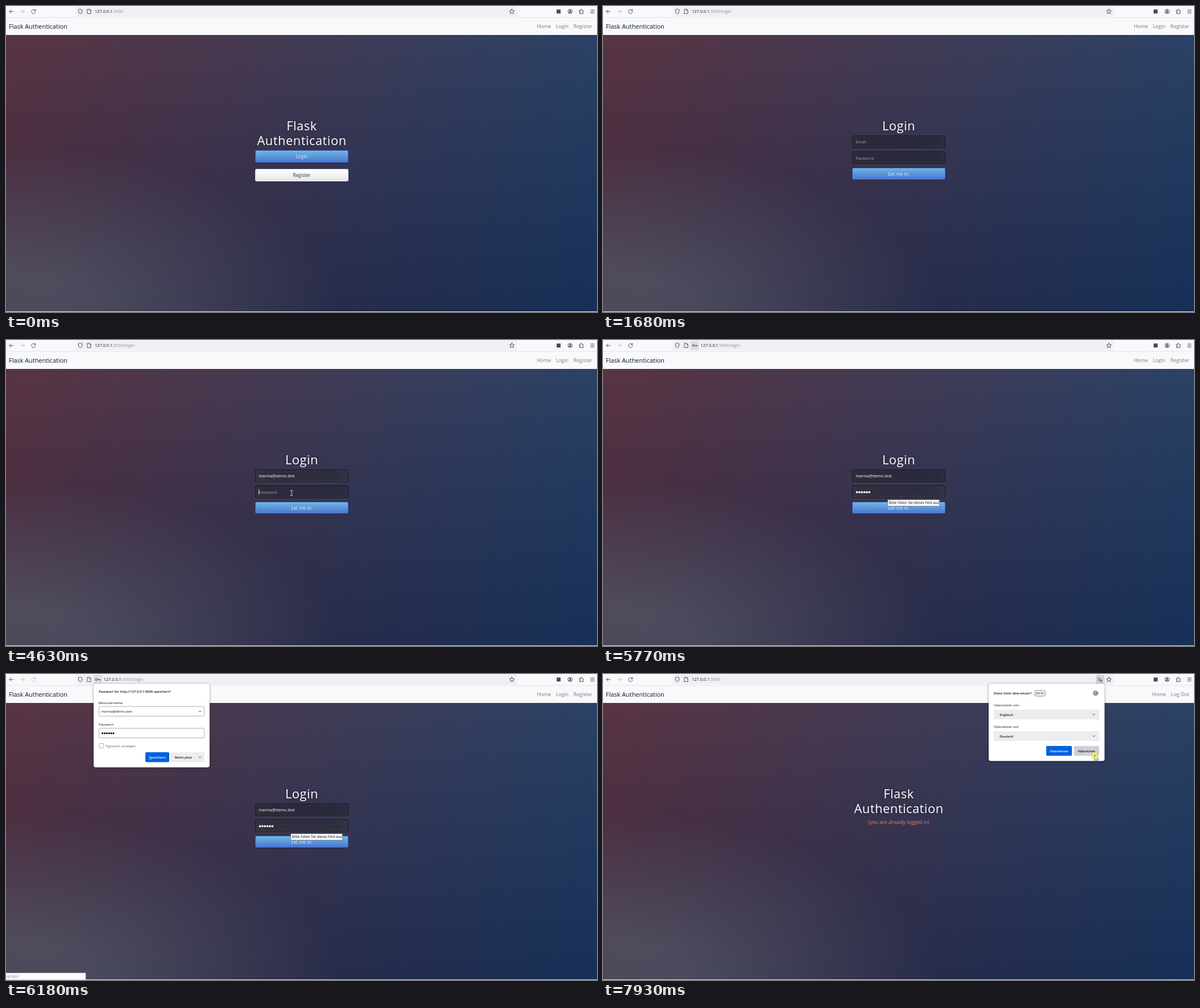
These frames come from a looping animation (1039x539 px, 8000 ms). An HTML page:

```html
<!DOCTYPE html>
<html lang="en">
<head>
<meta charset="utf-8">
<title>Flask Authentication</title>
<style>
html, body { margin: 0; width: 100%; height: 100%; overflow: hidden; background: #ececf1; }
#stage { position: absolute; left: 0; top: 0; width: 1039px; height: 539px; overflow: hidden; }
#page {
  position: absolute; left: 0; top: 20px; width: 1039px; height: 518px;
  background:
    radial-gradient(ellipse at 0% 100%, rgba(104,128,138,.4) 10%, rgba(138,114,76,0) 40%),
    linear-gradient(to bottom, rgba(57,173,219,.25) 0%, rgba(42,60,87,.4) 100%),
    linear-gradient(135deg, #670d10 0%, #092756 100%);
}
.box { position: absolute; left: 438.2px; width: 163.8px; box-sizing: border-box; border-radius: 2.2px; }
.btn {
  height: 21.8px; border: .55px solid #e6e6e6;
  background: linear-gradient(#fff, #e6e6e6);
  box-shadow: inset 0 .55px 0 rgba(255,255,255,.2), 0 .55px 1.1px rgba(0,0,0,.3);
}
.primary {
  border-color: #3762bc; background: linear-gradient(#6eb6de, #4a77d4);
  box-shadow: inset 0 .55px 0 rgba(255,255,255,.2), 0 .55px 1.1px rgba(0,0,0,.5);
}
.field {
  --glow: .2; height: 22.9px; background: rgba(0,0,0,.3); border: .55px solid rgba(0,0,0,.3);
  box-shadow: inset 0 -2.7px 24.6px rgba(100,100,100,var(--glow)), 0 .55px .55px rgba(255,255,255,.2);
}
svg { position: absolute; left: 0; top: 0; }
text { font-family: "Open Sans", "Noto Sans", sans-serif; white-space: pre; }
.mid { text-anchor: middle; }
.brand { font-size: 10.92px; fill: #10182c; }
.nav text { font-size: 8.74px; fill: #757a82; }
.h1 { font-size: 21.84px; letter-spacing: .546px; fill: #fff; text-anchor: middle; filter: drop-shadow(0 0 3px rgba(0,0,0,.3)); }
.label { font-size: 8.19px; text-anchor: middle; }
.shade { fill: #fff; filter: drop-shadow(.5px .5px .5px rgba(0,0,0,.4)); }
.val { font-size: 7.1px; fill: #fff; }
.hint { font-size: 7.1px; fill: #fff; fill-opacity: .54; }
.note { font-size: 8.74px; fill: #f97c54; text-anchor: middle; }
.addr { font-size: 7.4px; fill: #18181f; }
.ui { font-size: 6.1px; fill: #15141a; }
.ui .strong { font-weight: 600; }
.ui .title { font-weight: 600; font-size: 5.85px; }
.ui .white { fill: #fff; }
.icon { fill: none; stroke: #4b4b55; stroke-width: .95; stroke-linecap: round; stroke-linejoin: round; }
.edge { fill: none; stroke: #8f8f9d; stroke-width: .7; }
.panel { fill: #fff; stroke: rgba(0,0,0,.16); stroke-width: .5; filter: drop-shadow(0 1px 2px rgba(0,0,0,.3)); }
.blue { fill: #0061e0; }
.soft { fill: #ededf0; }
.dots { stroke-linecap: round; }
</style>
</head>
<body>
<div id="stage">
  <div id="page"></div>

  <div data-on="0 1140">
    <div class="box btn primary" id="loginBtn" style="top:254.3px"></div>
    <div class="box btn" style="top:287.3px"></div>
  </div>
  <div data-on="1140 6240">
    <div class="box field" id="mailBox" style="top:227.9px"></div>
    <div class="box field" id="passBox" style="top:256.3px"></div>
    <div class="box btn primary" style="top:284.6px"></div>
  </div>

  <svg width="1039" height="539" viewBox="0 0 1039 539">
    <defs>
      <path id="chev" class="icon" d="M-2.1-1.1L0 1L2.1-1.1"/>
    </defs>

    <!-- browser bar -->
    <rect width="1039" height="20" fill="#f9f9fb"/>
    <rect x="123" y="1" width="775" height="17.3" rx="2" fill="#f0f0f4"/>
    <rect y="20" width="1039" height="31" fill="#f8f9fa"/>
    <rect y="19.8" width="1039" height=".8" fill="#dedee5"/>
    <g class="icon">
      <path d="M12.8 9.7H6M9 6.7L6 9.7L9 12.7"/>
      <path stroke="#bcbcc6" style="stroke:#bcbcc6" d="M25.5 9.7H32.3M29.3 6.7L32.3 9.7L29.3 12.7"/>
      <path id="reload" d="M51.3 7.6A3.6 3.6 0 1 0 52 10.4M52 5.8V8.3H49.5"/>
      <path data-on="1010 1140 5910 6110" stroke-width="1.3" d="M46.2 8.6L48 6.6M46.4 6.6H48V8"/>
      <path d="M130.7 5.6L134 6.8V9.2Q134 12.3 130.7 13.8Q127.4 12.3 127.4 9.2V6.8Z"/>
      <path d="M143.3 5.8H147L149.2 8V13.4H143.3ZM147 5.8V8H149.2"/>
      <path id="star"/>
      <circle cx="991.7" cy="9.6" r="3.8"/>
      <circle cx="991.7" cy="8.5" r="1.2" fill="#4b4b55"/>
      <path d="M989.7 11.7Q991.7 10.4 993.7 11.7" stroke-width="1.4"/>
      <path d="M1008.3 7.8H1010V6.8A1.2 1.2 0 0 1 1012.4 6.8V7.8H1014.5V13.4H1008.3V11.6H1009.3A.9.9 0 0 0 1009.3 9.8H1008.3Z"/>
      <path d="M1027.8 7H1034M1027.8 9.7H1034M1027.8 12.4H1034"/>
    </g>
    <rect x="968" y="6.2" width="7" height="7" fill="#4b4b55"/>
    <g data-on="4770 7120">
      <rect x="154" y="1.4" width="14.6" height="16.5" rx="1.5" fill="#dedee5"/>
      <g class="icon"><circle cx="159" cy="9.6" r="1.9"/><path d="M161 9.6H165.8V11.4M163.7 9.6V11"/></g>
    </g>
    <text class="addr" id="addr" x="156" y="12.4">127.0.0.1<tspan fill="#8c8c96">:5000</tspan><tspan fill="#8c8c96" data-on="1080 6240">/login</tspan></text>
    <g data-on="6310 8000">
      <rect x="866.3" y="1.4" width="15.4" height="16.5" rx="1.5" fill="#d4d4dc"/>
      <text x="869" y="11" font-size="5.6" fill="#33333c" style="font-family:'Noto Sans CJK SC','Noto Sans CJK JP','Noto Sans CJK',sans-serif">文</text>
      <text x="873.8" y="13.6" font-size="6.2" font-weight="600" fill="#33333c">A</text>
    </g>

    <!-- site -->
    <text class="brand" x="5" y="40.1">Flask Authentication</text>
    <g class="nav" data-on="0 6240">
      <text x="933.4" y="39.2">Home</text><text x="966.8" y="39.2">Login</text><text x="997.6" y="39.2">Register</text>
    </g>
    <g class="nav" data-on="6240 8000">
      <text x="965" y="39.2">Home</text><text x="998.6" y="39.2">Log Out</text>
    </g>

    <g data-on="0 1140 6240 8000">
      <text class="h1" x="520" y="218.9">Flask</text>
      <text class="h1" x="520" y="245.1">Authentication</text>
    </g>
    <g data-on="0 1140">
      <text class="label shade" x="519.9" y="268.4">Login</text>
      <text class="label" x="519.9" y="301.4" fill="#333">Register</text>
    </g>
    <text class="note" data-on="6240 8000" x="520" y="264.3">(you are already logged in)</text>

    <g data-on="1140 6240">
      <text class="h1" x="520" y="218.9">Login</text>
      <text class="hint" data-on="1140 3700" x="444.2" y="242.1">Email</text>
      <text class="val" data-on="3700 6240" x="444.2" y="242.1">marina@demo.test</text>
      <text class="hint" data-on="1140 4770" x="444.2" y="270.5">Password</text>
      <line class="dots" id="dots" x1="446.6" x2="446.6" y1="268.1" y2="268.1" stroke="#fff" stroke-width="3.8" stroke-dasharray="0 4.35"/>
      <rect id="caret" width=".8" height="9.4" fill="#fff"/>
      <text class="label shade" x="519.9" y="298.6">Let me in.</text>
      <g class="ui" data-on="4970 6240">
        <rect x="500.7" y="281.4" width="90.6" height="11.2" rx=".8" fill="#fff" stroke="#77777f" stroke-width=".7"/>
        <text x="502.8" y="289.3" font-size="6.28" style="font-size:6.28px">Bitte füllen Sie dieses Feld aus.</text>
      </g>
    </g>

    <!-- status line -->
    <g data-on="750 1140 5980 6240">
      <rect x="-1" y="526.8" width="141" height="11.4" fill="#fbfbfd" stroke="#c8c8d0" stroke-width=".6"/>
      <text x="-.6" y="534.9" font-size="5.7" fill="#55555f">127.0.0.1<tspan data-on="750 1010">:5000/login</tspan></text>
    </g>

    <!-- save password -->
    <g class="ui" id="save" data-on="5980 7120">
      <rect class="panel" x="154" y="17" width="204" height="147.4" rx="4"/>
      <text class="title" x="163" y="33.2">Passwort für http://127.0.0.1:5000 speichern?</text>
      <text x="163" y="52.9">Benutzername</text>
      <rect class="edge" x="163.3" y="57.2" width="185.2" height="17" rx="2"/>
      <use href="#chev" x="341" y="66"/>
      <text x="163" y="91.2">Passwort</text>
      <rect class="edge" x="163.3" y="95.5" width="185.2" height="17" rx="2"/>
      <g data-on="6110 7120">
        <text x="167.4" y="68.2">marina@demo.test</text>
        <line class="dots" x1="169.6" x2="188.9" y1="104.4" y2="104.4" stroke="#15141a" stroke-width="3.2" stroke-dasharray="0 3.84"/>
      </g>
      <rect class="edge" x="163.7" y="122.2" width="8" height="8" rx="1"/>
      <text x="175" y="128.9" fill="#5b5b66">P<tspan text-decoration="underline">a</tspan>sswort anzeigen</text>
      <rect class="blue" x="245" y="137.8" width="42" height="17.4" rx="2"/>
      <text class="strong mid white" x="266" y="148.9"><tspan text-decoration="underline">S</tspan>peichern</text>
      <rect class="soft" id="later" x="290" y="137.8" width="58.8" height="17.4" rx="2"/>
      <text class="strong" x="296.6" y="148.9">Nicht jetzt</text>
      <use href="#chev" x="341" y="146.8"/>
    </g>

    <!-- translate page -->
    <g class="ui" id="trans" data-on="6310 8000">
      <rect class="panel" x="678" y="17" width="203.8" height="136.2" rx="4"/>
      <text class="title" x="687" y="36.3">Diese Seite übersetzen?</text>
      <rect class="edge" x="759.2" y="29" width="18" height="9.8" rx="1.8" style="stroke:#4b4b55"/>
      <text class="mid" x="768.2" y="36.2" style="font-size:5.9px">BETA</text>
      <g class="icon">
        <circle cx="866" cy="33.8" r="3.2" stroke-width="1"/>
        <circle cx="866" cy="33.8" r="4" stroke-width="1.2" stroke-linecap="butt" stroke-dasharray="1.57 1.57"/>
        <circle cx="866" cy="33.8" r="1.2"/>
      </g>
      <text x="687" y="57.2">Übersetzen von</text>
      <rect class="soft" x="687" y="62.5" width="185.3" height="17.4" rx="2"/>
      <text class="strong" x="697.3" y="73.6">Englisch</text>
      <use href="#chev" x="862.8" y="71.4"/>
      <text x="687" y="95.4">Übersetzen auf</text>
      <rect class="soft" x="687" y="100.6" width="185.3" height="17.4" rx="2"/>
      <text class="strong" x="697.3" y="111.8">Deutsch</text>
      <use href="#chev" x="862.8" y="109.6"/>
      <rect class="blue" x="779.2" y="126.8" width="45.2" height="17.2" rx="2"/>
      <text class="strong mid white" x="801.8" y="137.7" style="font-size:5.9px">Übersetzen</text>
      <rect class="soft" id="cancel" x="828" y="126.8" width="44.3" height="17.2" rx="2"/>
      <text class="strong mid" x="850.2" y="137.7" style="font-size:5.9px">Abbrechen</text>
    </g>

    <g id="mouse" data-on="130 1680 2940 4770 6310 8000">
      <circle data-on="1010 1080 3490 3560 7050 7120 7930 8000" cy="1" r="6.6" fill="#f2ee3c" fill-opacity=".7"/>
      <path id="arrow" d="M0 0V9.6L2.2 7.6L3.7 11L5.1 10.4L3.6 7.1H6.6Z" fill="#fff" stroke="#22222a" stroke-width=".6"/>
      <path id="beam" d="M-2.4-4.4H-.7L0-3.8L.7-4.4H2.4M0-3.8V3.8M-2.4 4.4H-.7L0 3.8L.7 4.4H2.4" fill="none" stroke="#e8e8ec" stroke-width=".9"/>
    </g>
  </svg>
</div>

<script>
const LOOP = 8000;
const $ = id => document.getElementById(id);
const clamp = v => Math.max(0, Math.min(1, v));
const ramp = (t, from, len) => clamp((t - from) / len);

// each element toggles at the listed times
const timed = [...document.querySelectorAll('[data-on]')]
  .map(el => [el, el.dataset.on.split(' ').map(Number)]);

const keys = [4770, 4840, 4970, 5230, 5300, 5370];

// time, x, y
const path = [
  [130, 870, 330], [300, 755, 298], [500, 638, 273], [700, 570, 261], [880, 551, 258],
  [1350, 551, 258], [1680, 349, 238],
  [2940, 325, 216], [3250, 440, 243], [3490, 523, 240.5],
  [3700, 523, 240.5], [4100, 512, 254], [4500, 502, 269.5],
  [4770, 502, 269.5], [6310, 500, 268], [6715, 500, 268],
  [6720, 415, 202], [6850, 318, 147], [7100, 318, 147],
  [7300, 600, 150], [7530, 858, 140], [7670, 858, 140], [7790, 864.6, 143]
];

function mouseAt(t) {
  const i = path.findIndex(p => p[0] > t);
  if (i === 0) return path[0].slice(1);
  if (i < 0) return path[path.length - 1].slice(1);
  const [t0, x0, y0] = path[i - 1], [t1, x1, y1] = path[i];
  const k = (t - t0) / (t1 - t0);
  return [x0 + (x1 - x0) * k, y0 + (y1 - y0) * k];
}

const show = (el, on) => { el.style.display = on ? '' : 'none'; };

function drawCaret(t, typed) {
  const inMail = t >= 3500 && t < 4090;
  const inPass = t >= 4600 && t < 5770;
  const x = inMail ? (t < 3700 ? 444 : 506.8) : 444 + typed * 4.4;
  $('caret').setAttribute('x', x);
  $('caret').setAttribute('y', inMail ? 234.6 : 263);
  show($('caret'), inMail || inPass);
}

function drawMouse(t) {
  const [x, y] = mouseAt(t);
  const overField = t >= 1140 && t < 6240 && x > 438 && x < 602 &&
    (y > 228 && y < 251 || y > 256 && y < 279);
  $('mouse').setAttribute('transform', `translate(${x} ${y})`);
  show($('beam'), overField);
  show($('arrow'), !overField);
}

function render(t) {
  for (const [el, marks] of timed) show(el, marks.filter(m => m <= t).length % 2);

  const typed = keys.filter(k => k <= t).length;
  $('dots').setAttribute('x2', 446.7 + 4.35 * (typed - 1));
  show($('dots'), typed);
  drawCaret(t, typed);
  drawMouse(t);

  const glow = (from, to) => .2 + .2 * (ramp(t, from, 350) - ramp(t, to, 350));
  $('mailBox').style.setProperty('--glow', glow(3490, 4540));
  $('passBox').style.setProperty('--glow', glow(4540, LOOP));
  $('loginBtn').style.backgroundPosition = `0 ${-8.2 * ramp(t, 690, 100)}px`;

  $('addr').setAttribute('x', t >= 4770 && t < 7120 ? 171.6 : 156);
  const loading = t >= 1010 && t < 1140 || t >= 5910 && t < 6110;
  show($('reload'), !loading);
  $('reload').style.stroke = t >= 6110 && t < 6790 ? '#c0c0ca' : '#4b4b55';

  $('save').style.opacity = ramp(t, 5980, 65);
  $('trans').style.opacity = ramp(t, 6290, 70);
  $('later').style.fill = t >= 6850 ? '#dcdce3' : '#ededf0';
  $('cancel').style.fill = t >= 7930 ? '#cfcfd8' : t >= 7500 ? '#e0e0e6' : '#ededf0';
}

const star = [...Array(10)].map((_, i) => {
  const a = i * Math.PI / 5, r = i % 2 ? 2.1 : 4.5;
  return `${889.4 + r * Math.sin(a)} ${9.8 - r * Math.cos(a)}`;
});
$('star').setAttribute('d', `M${star.join('L')}Z`);

const start = performance.now();
function tick() {
  render((performance.now() - start) % LOOP);
  requestAnimationFrame(tick);
}
tick();
</script>
</body>
</html>
```
